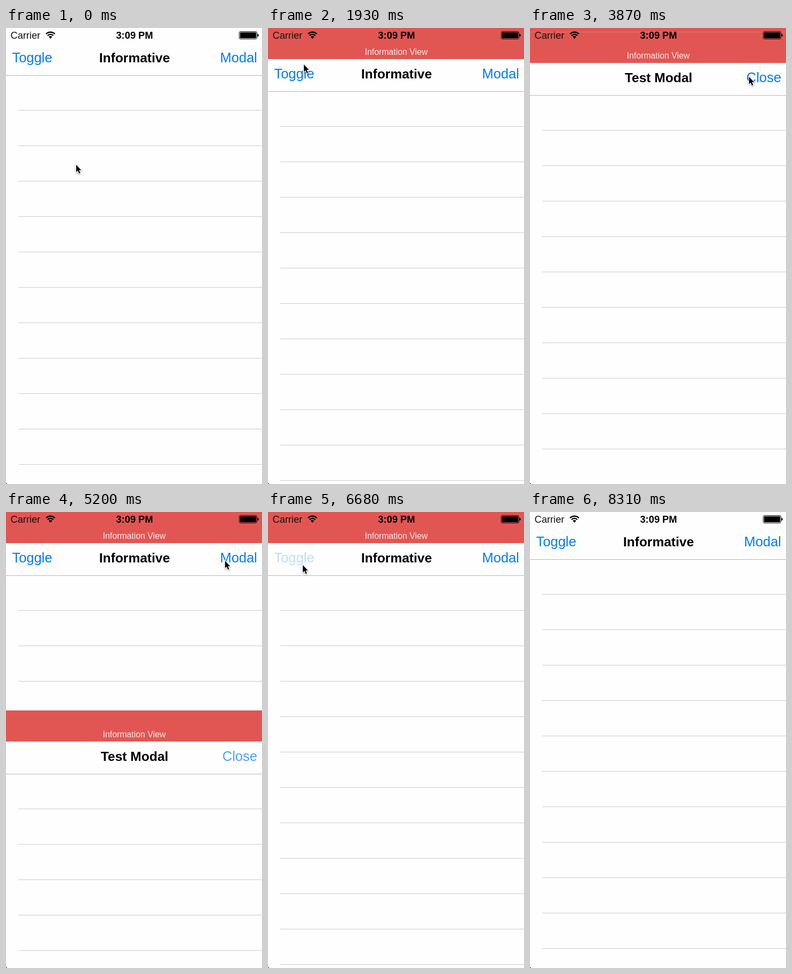
Recreate the animation shown at these times as an HTML page with a canvas. Size 478 by 850 pixels, loop 8340 ms.

```html
<!DOCTYPE html>
<html>
<head>
<meta charset="utf-8">
<style>
html, body { margin: 0; width: 100%; height: 100%; overflow: hidden; background: #fefefe; }
canvas { display: block; width: 100vw; height: 100vh; }
</style>
</head>
<body>
<canvas id="stage" width="478" height="850"></canvas>
<script>
const ctx = document.getElementById('stage').getContext('2d');
const W = 478, H = 850, LOOP = 8340, STEP = 148.6;
const FONT = '"Liberation Sans", Arial, sans-serif';
const BLUE = '#007aff', RED = '#e15652', PAPER = '#fefefe';

// Cursor path: step, x, y
const path = [
  [0, 130, 254], [2, 130, 254], [7, 66, 67], [17, 66, 67], [20, 350, 102],
  [22, 408, 90], [35, 408, 90], [39, 64, 98], [45.5, 64, 98], [48, 197, 213],
  [51, 297, 815], [52, 310, 900]
];

const clamp = v => Math.max(0, Math.min(1, v));
const ease = v => (1 - Math.cos(Math.PI * clamp(v))) / 2;

// Remaining distance of a critically damped spring, t in ms
function spring(t) {
  const u = 0.01826 * Math.max(0, t);
  return (1 + u) * Math.exp(-u);
}

function cursorAt(n) {
  const i = path.findIndex(k => k[0] > n);
  if (i < 0) return path[path.length - 1].slice(1);
  const [n0, x0, y0] = path[i - 1], [n1, x1, y1] = path[i];
  const k = ease((n - n0) / (n1 - n0));
  return [x0 + (x1 - x0) * k, y0 + (y1 - y0) * k];
}

// Opacity of a button held from step a to step b
const press = (n, a, b) => n >= a && n <= b ? 0.25 : n === b + 1 ? 0.7 : 1;

function rect(x, y, w, h, color) {
  ctx.fillStyle = color;
  ctx.fillRect(x, y, w, h);
}

function text(str, x, y, size, color, align = 'left', weight = 'normal', alpha = 1) {
  ctx.save();
  ctx.globalAlpha *= alpha;
  ctx.font = `${weight} ${size}px ${FONT}`;
  ctx.textAlign = align;
  ctx.fillStyle = color;
  ctx.fillText(str, x, y);
  ctx.restore();
}

function banner(bottom, alpha) {
  ctx.save();
  ctx.globalAlpha = alpha;
  rect(0, bottom - 58, W, 58, RED);
  text('Information View', 239.5, bottom - 8, 15.8, 'rgba(255,255,255,.88)', 'center');
  ctx.restore();
}

// Navigation bar and empty table, pushed down by dy
function page(title, left, right, dy, leftAlpha, rightAlpha) {
  rect(0, 0, W, H, PAPER);
  text(left, 11.5, 64 + dy, 25.4, BLUE, 'left', 'normal', leftAlpha);
  text(title, 240, 64 + dy, 24.5, '#000', 'center', 'bold');
  text(right, 469, 64 + dy, 25.4, BLUE, 'right', 'normal', rightAlpha);
  rect(0, 88 + dy, W, 1, '#b6b6b6');
  for (let y = 153 + dy; y < H; y += 66) rect(23, y, W - 23, 1, '#cbcbcd');
}

function statusBar() {
  text('Carrier', 8.5, 20, 18.2, '#111');
  text('3:09 PM', 240, 20, 18.3, '#000', 'center', 'bold');
  ctx.strokeStyle = ctx.fillStyle = '#000';
  ctx.lineWidth = 2.4;
  for (const r of [7.6, 11.8]) {
    ctx.beginPath();
    ctx.arc(83, 19.5, r, -Math.PI * 0.75, -Math.PI * 0.25);
    ctx.stroke();
  }
  ctx.beginPath();
  ctx.moveTo(83, 20);
  ctx.arc(83, 19.5, 4.6, -Math.PI * 0.75, -Math.PI * 0.25);
  ctx.fill();
  ctx.lineWidth = 1;
  ctx.beginPath();
  ctx.roundRect(435.5, 6.5, 33, 14, 2.5);
  ctx.stroke();
  ctx.beginPath();
  ctx.roundRect(437, 8, 30, 11, 1);
  ctx.fill();
  ctx.beginPath();
  ctx.roundRect(469.5, 11, 2.3, 5, [0, 2, 2, 0]);
  ctx.fill();
}

function cursor(x, y) {
  ctx.save();
  ctx.translate(x + 1, y + 1);
  const arrow = new Path2D('M0 0V13.5L3.1 10.7L5.5 16.2L7.7 15.3L5.3 9.9H9.5Z');
  ctx.shadowColor = 'rgba(0,0,0,.4)';
  ctx.shadowBlur = 3;
  ctx.shadowOffsetY = 1;
  ctx.strokeStyle = '#fff';
  ctx.lineWidth = 2;
  ctx.stroke(arrow);
  ctx.shadowColor = 'transparent';
  ctx.fillStyle = '#000';
  ctx.fill(arrow);
  ctx.restore();
}

function draw(ms) {
  const n = Math.floor((ms + 12) / STEP), t = n * STEP;
  const shown = ease((t - 1385) / 500) - ease((t - 6800) / 500);
  const toggle = Math.min(press(n, 8, 9), press(n, 44, 45));

  page('Informative', 'Toggle', 'Modal', 30 * shown, toggle, press(n, 22, 23));
  if (shown > 0) banner(60 * shown - 2, shown);

  const modalY = H * (t < 5120 ? spring(t - 3490) : 1 - spring(t - 5120));
  if (modalY < H - 0.5) {
    ctx.save();
    ctx.translate(0, modalY < 0.5 ? 0 : modalY);
    page('Test Modal', '', 'Close', 30, 1, press(n, 34, 34));
    banner(58, 1);
    ctx.restore();
  }

  statusBar();
  cursor(...cursorAt(n));
  ctx.fillStyle = '#000';
  ctx.fill(new Path2D('M0 848L2 850H0Z'));
}

let start;
function tick(now) {
  start ??= now;
  draw((now - start) % LOOP);
  requestAnimationFrame(tick);
}
draw(0);
requestAnimationFrame(tick);
</script>
</body>
</html>
```
